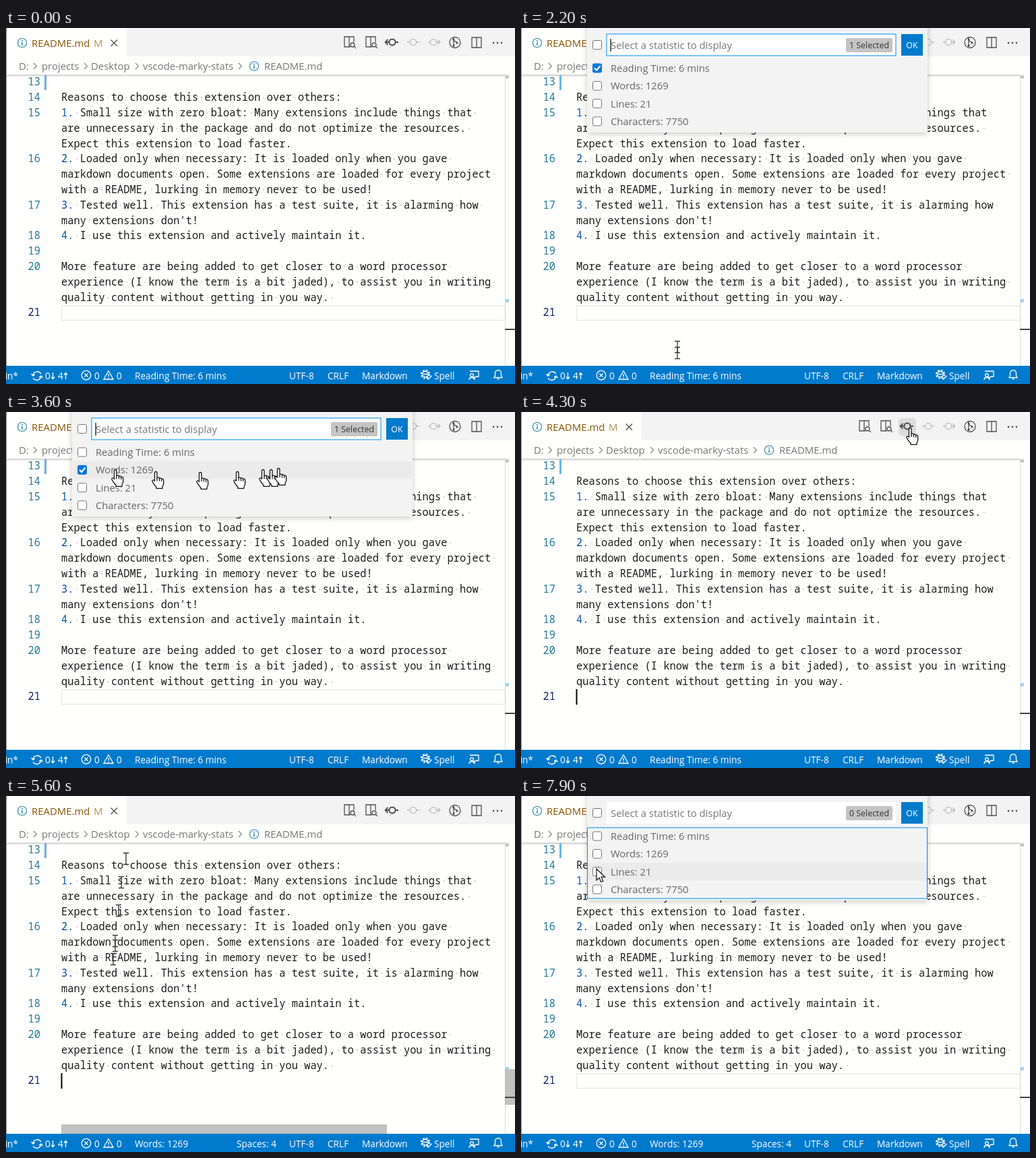
Write an HTML page that moves like this. It is 755 px wide and 528 px high and loops after 8 s.

```html
<!DOCTYPE html>
<html lang="en">
<head>
<meta charset="utf-8">
<title>Reading statistics picker</title>
<style>
  html, body { margin: 0; width: 100%; height: 100%; overflow: hidden; background: #fffffe; }
  svg { display: block; width: 755px; height: 528px; }
  text { font: 14.9px "Open Sans", "Noto Sans", sans-serif; white-space: pre; }
  .code text { font: 15.4px "Noto Sans Mono", "DejaVu Sans Mono", monospace; fill: #1c1c1c; }
  .code .num { fill: #237893; text-anchor: end; }
  .code .now { fill: #0b216f; }
  .code .mark { fill: #0451a5; }
  .code .dot { fill: #cdcdcd; }
  .crumbs text { fill: #767676; }
  .status text { font-size: 13.67px; fill: #fff; }
  .picker text { font-size: 14.75px; fill: #666; }
  .picker .small { font-size: 12.4px; fill: #333; }
  .icon { fill: none; stroke: #505050; stroke-width: 1.3; }
  .pale { stroke: #bdbdbd; }
  .light { stroke: #fff; }
</style>
</head>
<body>
<svg id="stage" viewBox="0 0 755 528"></svg>
<script>
const LOOP = 8000, STEP = 100, TRAIL_STEP = 50, PITCH = 22.8, ROW = 26.3, LIST_TOP = 46.5;

const LINES = [
  [13, ""],
  [14, "Reasons to choose this extension over others:"],
  [15, "1. Small size with zero bloat: Many extensions include things that "],
  [0, "are unnecessary in the package and do not optimize the resources. "],
  [0, "Expect this extension to load faster."],
  [16, "2. Loaded only when necessary: It is loaded only when you gave "],
  [0, "markdown documents open. Some extensions are loaded for every project "],
  [0, "with a README, lurking in memory never to be used!"],
  [17, "3. Tested well. This extension has a test suite, it is alarming how "],
  [0, "many extensions don't!"],
  [18, "4. I use this extension and actively maintain it."],
  [19, ""],
  [20, "More feature are being added to get closer to a word processor "],
  [0, "experience (I know the term is a bit jaded), to assist you in writing "],
  [0, "quality content without getting in you way. "],
  [21, ""]
];
const STATS = ["Reading Time: 6 mins", "Words: 1269", "Lines: 21", "Characters: 7750"];

// time, x, y of the hot spot, shape (a: arrow, h: hand, i: text beam)
const PATH = [
  [300, 420, 6, "a"], [400, 375, 54, "h"], [500, 330, 120, "i"], [800, 262, 330, "i"],
  [1000, 238, 470, "i"], [1100, 232, 508, "h"], [2100, 232, 508, "h"],
  [2150, 232, 482, "i"], [2200, 232, 473, "i"], [2300, 215, 400, "i"], [2400, 180, 260, "i"],
  [2500, 140, 120, "h"], [2600, 113, 62, "a"], [2800, 113, 62, "a"], [2900, 113, 87, "a"],
  [3200, 113, 87, "a"],
  [3300, 162, 86, "h"], [3350, 222, 89, "h"], [3400, 288, 90, "h"], [3450, 343, 89, "h"],
  [3500, 381, 86, "h"], [3550, 393, 86, "h"], [3600, 404, 84, "h"],
  [3700, 468, 66, "h"], [3800, 552, 36, "a"], [3900, 577, 24, "h"], [4300, 577, 24, "h"],
  [4500, 581, 22, "h"], [5000, 581, 22, "h"], [5200, 330, 52, "h"],
  [5350, 178, 93, "i"], [5400, 171, 128, "i"], [5450, 167, 170, "i"], [5500, 162, 215, "i"],
  [5550, 162, 222, "i"], [5600, 159, 242, "i"], [5800, 164, 400, "i"], [5900, 182, 480, "i"],
  [6000, 197, 508, "h"], [6300, 197, 508, "h"],
  [6450, 187, 473, "i"], [6500, 173, 437, "i"], [6550, 173, 431, "i"], [6600, 160, 391, "i"],
  [6800, 142, 285, "i"], [7000, 125, 165, "i"], [7200, 113, 112, "a"], [7400, 112, 88, "a"],
  [7700, 112, 88, "a"], [7900, 112, 108, "a"]
];
// spans in which the pointer leaves its earlier poses behind
const TRAILS = [[2150, 2300], [3300, 3900], [5350, 5800], [6450, 6700]];

const BARS = [[300, 0], [600, 1], [1000, 1], [1400, 0], [2200, 0], [2400, 1], [2500, 1], [2900, 0],
  [5100, 0], [5300, 1], [5900, 1], [6600, .3], [6900, 0]];

const rect = (x, y, w, h, fill, more = "") =>
  `<rect x="${x}" y="${y}" width="${w}" height="${h}" fill="${fill}" ${more}/>`;
const text = (x, y, s, more = "") => `<text x="${x}" y="${y}" ${more}>${s}</text>`;
const path = (d, more = 'class="icon"') => `<path d="${d}" ${more}/>`;
const circle = (x, y, r, more = 'class="icon"') => `<circle cx="${x}" cy="${y}" r="${r}" ${more}/>`;
const info = (x, y) => circle(x, y, 6.6, 'fill="none" stroke="#519aba" stroke-width="1.4"') +
  path(`M${x} ${y - 4}v2M${x} ${y - 1}v5`, 'stroke="#519aba" stroke-width="1.8"');

function codeLine([num, line], i) {
  const y = 85.4 + i * PITCH;
  const body = line.replace(/^\d\./, "<tspan class='mark'>$&</tspan>")
    .replace(/ (?!class)/g, "<tspan class='dot'>·</tspan>");
  return (num ? text(51, y, num, `class="num${num === 21 ? " now" : ""}"`) : "") + text(82, y, body);
}

const peek = x => path(`M${x + 1} 28h-9v-15h14v8M${x - 1} 13v15`) +
  circle(x + 4, 25, 3) + path(`M${x + 6} 27l3 3`);

function toolbar() {
  return rect(560, 9, 26, 26, "#dcdcdc", 'id="toolHover" rx="5"') +
    peek(510) + peek(542) +
    circle(573, 21, 4.6, 'class="icon" style="stroke-width:2"') +
    path("M568 21h-5M566.500 17l-4 4 4 4M578 21h4", 'class="icon" style="stroke-width:1.8"') +
    circle(604, 21, 4.6, 'class="icon pale"') + path("M595 21h4M609 21h4", 'class="icon pale"') +
    circle(634, 21, 4.6, 'class="icon pale"') + path("M626 21h3M639 21h5M640.500 17.500l3.500 3.500-3.500 3.500", 'class="icon pale"') +
    circle(666, 21.500, 8) + path("M664 14v14M664 18l5 4") +
    [[664, 17], [664, 26], [669, 22]].map(([x, y]) => circle(x, y, 1.5, 'fill="#424242"')).join("") +
    path("M691 14h14v15h-14zM698 14v15") +
    [723, 729, 735].map(x => circle(x, 22, 1.3, 'fill="#424242"')).join("");
}

function statusBar() {
  const line = 'class="icon light"';
  return `<g class="status">` + rect(0, 501, 755, 27, "#007acc") +
    rect(185, 501, 148, 27, "#fff", 'id="statusHover" opacity=".12"') +
    text(18, 521, "main*", 'text-anchor="end"') +
    path("M40 515a6.500 6.500 0 0 1 12 -2M52 517a6.500 6.500 0 0 1 -12 2M37.500 513l2.500 3 3-2.500M54.500 519l-2.500-3-3 2.500", line) +
    text(58, 521, "0") + path("M69.500 511v9M67 517.500l2.500 3 2.500-3", line) +
    text(77, 521, "4") + path("M88.500 521v-9M86 514.500l2.500-3 2.500 3", line) +
    circle(119, 515, 6.8, line) + path("M116.500 512.500l5 5M121.500 512.500l-5 5", line) + text(131, 521, "0") +
    path("M152 508.500l7 12.500h-14zM152 513v4M152 518v1.500", line) + text(164, 521, "0") +
    text(191, 521, "", 'id="stat"') + text(342, 521, "Spaces: 4", 'id="spaces"') +
    text(420, 521, "UTF-8") + text(477, 521, "CRLF") + text(528, 521, "Markdown") +
    circle(622, 513.5, 5.8, 'fill="none" stroke="#fff" stroke-width="2.4" stroke-dasharray="2.6 1.95"') +
    circle(622, 513.5, 4.2, line) + path("M619 513.500h6M624 518.500l2.500 2.500 5-5.500", line) + text(635, 521, "Spell") +
    path("M688 509h13v8h-4l-3 3v-3", line) + circle(691, 515, 2.3, line) + path("M687 522c0-5 8-5 8 0", line) +
    path("M724 518.500h12l-1.500-3v-3.500a4.500 4.500 0 0 0-9 0v3.500zM728.500 520.500h3", line) + `</g>`;
}

const box = (y, id) => rect(106.5, y - 6.5, 13, 13, "#fff", `id="${id}" rx="2" stroke="#767676"`) +
  path(`M109 ${y}l3 3.200 5.500-6.500`, `id="${id}Tick" fill="none" stroke="#fff" stroke-width="2.200"`);

function picker() {
  return `<g id="picker" class="picker">` +
    rect(98, -10, 505, 165, "#f3f3f3", 'filter="url(#shade)"') +
    rect(99, 0, 503, ROW, "#ebebeb", 'id="rowHover"') +
    box(25, "all") + rect(127, 9, 429, 32, "#fff", 'id="field"') +
    text(133, 31, "Select a statistic to display", 'style="font-size:14.85px;fill:#767676"') +
    rect(132.5, 16, 1.2, 19, "#000", 'id="fieldCaret"') +
    rect(482, 15, 69, 21, "#c4c4c4", 'rx="2"') + text(516.5, 30, "", 'id="count" class="small" text-anchor="middle"') +
    rect(564, 9, 32, 32, "#007acc", 'id="ok"') + text(580, 30, "OK", 'class="small" style="fill:#fff" text-anchor="middle"') +
    STATS.map((s, i) => box(59.5 + i * ROW, "b" + i) + text(133, 65 + i * ROW, s)).join("") +
    rect(98.5, 47, 504, 105, "none", 'id="listFocus" stroke="#0090f1"') + `</g>`;
}

const SHAPES =
  `<g id="a">` + path("M0 0v17l4-3.700 2.700 6.200 3-1.300-2.700-6h5.500z", 'fill="#fff" stroke="#111" stroke-width="1.200"') + `</g>` +
  `<g id="h">` + path("M-1.500 1c0-2 3.500-2 3.500 0v8c1-1.500 3.500-1 3.500.7 1-1.200 3-.7 3.200.8 1.300-.8 3 0 3 1.600v5.400c0 2-1.700 3-1.700 5v1.800h-9v-2c-2-2-4.500-5-6-8.300-.7-2 1.700-3 3.500-.7zM2 9v4M5.500 10v3.500M8.700 11v3",
    'fill="#fff" stroke="#111" stroke-width="1.300" stroke-linejoin="round"') + `</g>` +
  `<g id="i">` + path("M-4-8.500h3l1 1 1-1h3M-4 8.500h3l1-1 1 1h3M0-7.500v15", 'fill="none" stroke="#333" stroke-width="1.300"') + `</g>`;

document.getElementById("stage").innerHTML =
  `<defs>${SHAPES}<filter id="shade" x="-5%" y="-10%" width="110%" height="125%">
    <feDropShadow dx="0" dy="2" stdDeviation="4" flood-color="#000" flood-opacity=".22"/></filter>
    <linearGradient id="edge" x2="0" y2="1"><stop stop-color="#ccc"/><stop offset="1" stop-color="#ccc" stop-opacity="0"/></linearGradient></defs>` +
  rect(0, 0, 755, 528, "#fffffe") + rect(179, 0, 576, 42, "#f3f3f3") +
  info(24, 22) + text(38, 27.5, "README.md", 'fill="#895503"') +
  text(130, 27.5, "M", 'fill="#b0905f"') + path("M155.500 17.500l9.500 9.500M165 17.500l-9.500 9.500") +
  toolbar() +
  `<g class="crumbs">` + [[19, "D:"], [53, "projects"], [126, "Desktop"], [203, "vscode-marky-stats"], [383, "README.md"]]
    .map(([x, s]) => text(x, 62, s)).join("") + `</g>` +
  [41, 116, 192, 345].map(x => path(`M${x} 52l4.500 4.500-4.500 4.500`, 'fill="none" stroke="#888" stroke-width="1.300"')).join("") +
  info(368, 56.5) +
  rect(0, 69, 741, 4, "url(#edge)") + rect(57, 70, 3, 22, "#66b2e4") +
  rect(82.5, 412, 658, 21.5, "none", 'id="current" stroke="#eaeaea" stroke-width="1.600"') +
  `<g class="code">${LINES.map(codeLine).join("")}</g>` +
  rect(81.5, 411, 2, 23, "#000", 'id="caret"') +
  rect(82, 487, 483, 14, "#c1c1c1", 'id="hBar"') +
  rect(740, 69, 1, 432, "#dcdcdc") + rect(741, 70, 5, 5, "#c3cbc9") + rect(741, 402, 5, 5, "#a6d3f2") +
  rect(740, 405, 15, 53, "#c1c1c1", 'id="vBar"') + rect(740, 446, 15, 2, "#444") +
  rect(0, 0, 1, 501, "#8a8a8a") + statusBar() + picker() + `<g id="pointers"></g>`;

const el = id => document.getElementById(id);
const show = (id, on) => el(id).setAttribute("visibility", on ? "inherit" : "hidden");
const set = (id, name, value) => el(id).setAttribute(name, value);
const within = (t, a, b) => t >= a && t < b;

function level(t, keys, col = 1) {
  const n = keys.findIndex(k => k[0] > t);
  if (n < 0) return keys[keys.length - 1][col];
  if (n === 0) return keys[0][col];
  const a = keys[n - 1], b = keys[n];
  return a[col] + (b[col] - a[col]) * (t - a[0]) / (b[0] - a[0]);
}

function pointerAt(t) {
  if (t < PATH[0][0]) return null;
  const shape = PATH.filter(k => k[0] <= t).pop()[3];
  return { x: level(t, PATH), y: level(t, PATH, 2), shape };
}

function tick(id, on) {
  set(id, "fill", on ? "#0075e0" : "#fff");
  set(id, "stroke", on ? "#0075e0" : "#767676");
  show(id + "Tick", on);
}

function draw(t) {
  const open = within(t, 1500, 4300) || t >= 6200;
  const listFocus = within(t, 2700, 2900) || t >= 7500;
  const picked = [t < 2700, within(t, 2900, 7700), false, false];
  const caretOn = !open && (within(t, 300, 800) || within(t, 4300, 4500) || within(t, 5500, 6000));
  const p = pointerAt(t);
  const over = (x, y, w, h) => p && within(p.x, x, x + w) && within(p.y, y, y + h);

  show("picker", open);
  picked.forEach((on, i) => tick("b" + i, on));
  tick("all", false);
  el("count").textContent = picked.filter(Boolean).length + " Selected";
  show("listFocus", listFocus);
  show("fieldCaret", !listFocus);
  set("field", "stroke", listFocus ? "none" : "#0090f1");
  const inList = open && over(98, LIST_TOP, 505, ROW * 4);
  show("rowHover", inList);
  if (inList) set("rowHover", "y", LIST_TOP + ROW * Math.floor((p.y - LIST_TOP) / ROW));
  set("ok", "fill", over(564, 9, 32, 32) ? "#0062a3" : "#007acc");

  show("toolHover", !open && over(560, 9, 26, 26));
  show("statusHover", over(185, 501, 148, 27));
  el("stat").textContent = STATS[t < 4700 ? 0 : 1];
  show("spaces", t >= 4700);
  show("caret", caretOn);
  show("current", !caretOn);
  set("hBar", "opacity", level(t, BARS));
  set("vBar", "opacity", level(t, BARS));

  const trail = TRAILS.find(([a, b]) => within(t, a, b));
  let marks = "";
  for (let s = trail ? trail[0] : t; s <= t; s += TRAIL_STEP) {
    const q = pointerAt(s);
    if (q) marks += `<use href="#${q.shape}" x="${q.x}" y="${q.y}"/>`;
  }
  el("pointers").innerHTML = marks;
}

let last = -1;
function frame() {
  const t = Math.floor(performance.now() % LOOP / STEP) * STEP;
  if (t !== last) draw(last = t);
  requestAnimationFrame(frame);
}
frame();
</script>
</body>
</html>
```
